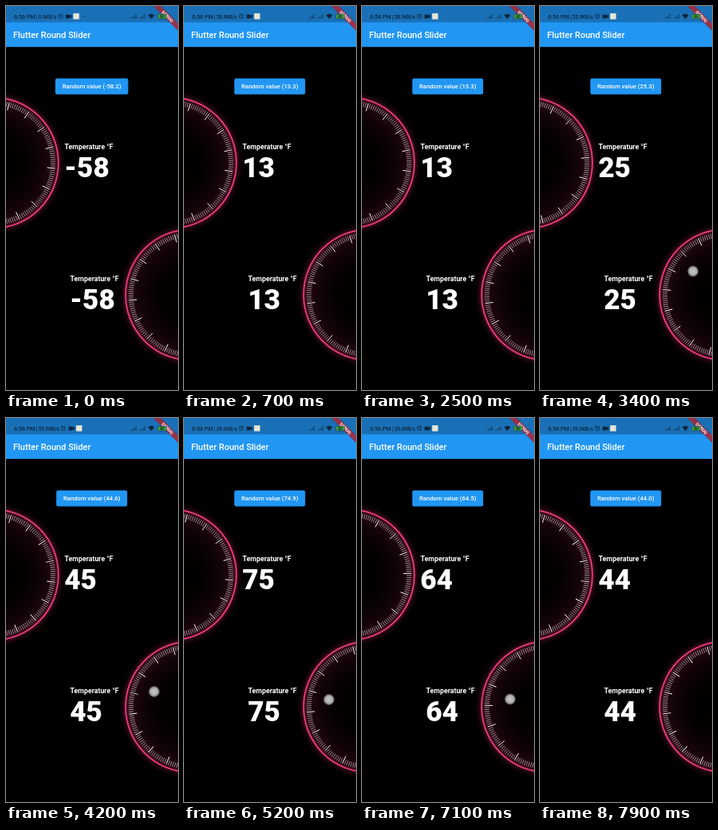
Recreate the animation shown at these times as an HTML page. Size 216 by 480 pixels, loop 8000 ms.

```html
<!DOCTYPE html>
<html lang="en">
<head>
<meta charset="utf-8">
<title>Round slider</title>
<style>
  html, body { margin: 0; width: 100%; height: 100%; overflow: hidden; background: #000; }
  svg { display: block; width: 100%; height: 100%; font-family: Roboto, sans-serif; }
  .label { font-size: 8.8px; font-weight: 700; fill: #fff; }
  .value { font-size: 35.2px; font-weight: 900; fill: #fff; }
  .status { fill: #0b2740; font-weight: 500; }
</style>
</head>
<body>
<svg viewBox="0 0 216 480">
  <defs>
    <radialGradient id="glow">
      <stop offset="0" stop-color="#000"/>
      <stop offset=".45" stop-color="#040002"/>
      <stop offset=".7" stop-color="#120309"/>
      <stop offset=".84" stop-color="#220611"/>
      <stop offset=".89" stop-color="#3c0c1f"/>
      <stop offset=".91" stop-color="#420e22"/>
      <stop offset=".95" stop-color="#19050d"/>
      <stop offset="1" stop-color="#000"/>
    </radialGradient>
    <radialGradient id="finger">
      <stop offset="0" stop-color="#c4c4c4"/>
      <stop offset=".55" stop-color="#b4b4b4"/>
      <stop offset=".75" stop-color="#959595"/>
      <stop offset="1" stop-color="#666" stop-opacity=".35"/>
    </radialGradient>
    <g id="face">
      <circle r="90" fill="url(#glow)"/>
      <circle r="81.8" fill="none" stroke="#f23e7d" stroke-width="1.7"/>
    </g>
    <g id="ticks" fill="none">
      <path id="minor" stroke="#c9c0c4" stroke-width=".65"/>
      <path id="major" stroke="#fff" stroke-width=".9"/>
    </g>
  </defs>

  <rect width="216" height="480"/>

  <g transform="translate(-16 196)"><use href="#face"/><use id="left" href="#ticks"/></g>
  <g transform="translate(232 361)"><use href="#face"/><use id="right" href="#ticks"/></g>

  <rect width="216" height="51.2" fill="#2196f3"/>
  <rect width="216" height="20.4" fill="#1a70b6"/>
  <text x="9" y="40" font-size="11" font-weight="500" fill="#fff">Flutter Round Slider</text>

  <g transform="translate(216 0) rotate(45)">
    <rect x="-24" y="14.9" width="48" height="7.4" fill="#000" opacity=".15"/>
    <rect x="-24" y="15.4" width="48" height="6.4" fill="#a92b3c" opacity=".88"/>
    <text y="20.6" font-size="5.6" font-weight="900" text-anchor="middle" fill="#f3e6ea">DEBUG</text>
  </g>

  <text class="status" x="10" y="15.6" font-size="7.1">6:56 PM</text>
  <text class="status" x="37.5" y="15.5" font-size="6.3" id="speed"></text>
  <g id="icons">
    <circle cx="68.4" cy="13" r="2.6" fill="none" stroke="#0b2740" stroke-width=".8"/>
    <path d="M68.4 11.5V13.2H69.8M65.6 10.8L66.8 9.8M71.2 10.8L70 9.8" fill="none" stroke="#0b2740" stroke-width=".6"/>
    <path d="M75 10.8h5v1.3l2.4-1.3v4.5l-2.4-1.3v1.4h-5z" fill="#0b2740"/>
    <rect x="84.5" y="9.2" width="7.4" height="7.4" fill="#e8e6d8"/>
  </g>
  <circle id="dot" cx="98" cy="13" r=".7" fill="#0b2740"/>
  <g fill="#0b2740">
    <path id="bars" d="M156.5 15.8v-1.4h1.1v1.4zM158.6 15.8v-2.6h1.1v2.6zM160.7 15.8v-4h1.1v4zM162.8 15.8v-5.6h1.1v5.6z" opacity=".65"/>
    <use href="#bars" x="11"/>
    <path d="M178.5 11.6Q182.5 8 186.5 11.6L182.5 16.2z"/>
  </g>
  <rect x="190.5" y="10.3" width="11" height="5.6" rx="1.4" fill="#43a047" stroke="#0b2740" stroke-width=".5"/>
  <text x="196" y="15" font-size="5" font-weight="700" text-anchor="middle" fill="#12351f">60</text>

  <rect id="button" y="90.5" height="19.9" rx="2.2" fill="#2196f3"/>
  <text id="caption" x="107.7" y="103.3" font-size="7.7" font-weight="500" text-anchor="middle" fill="#fff"></text>

  <text class="label" x="73.5" y="179">Temperature °F</text>
  <text class="value" x="73.2" y="213.5"></text>
  <text class="label" x="80.5" y="344">Temperature °F</text>
  <text class="value" x="80.2" y="378.5"></text>

  <circle id="touch" r="7.2" fill="url(#finger)"/>
</svg>

<script>
const LOOP = 8000, STEP = 100, TURN = 0.6;
const $ = id => document.getElementById(id);
const readings = document.querySelectorAll('.value');

// time, value
const values = [[0, -58.2], [700, -58.2], [700, 13.3], [2900, 13.3], [4200, 44.6],
  [5200, 74.9], [6300, 105.4], [7500, 44], [8000, 44]];
// time, x, y
const drag = [[2900, 196, 325], [4200, 186, 342], [5200, 182, 352], [6300, 193, 370],
  [6700, 186, 361], [7500, 186, 342]];
const speeds = [[0, '0.0'], [700, '58.9'], [3300, '55.9'], [4700, '39.0']];

function sample(table, t) {
  let i = 0;
  while (i < table.length - 2 && t >= table[i + 1][0]) i++;
  const a = table[i], b = table[i + 1];
  const k = Math.min(1, Math.max(0, (t - a[0]) / (b[0] - a[0])));
  return a.slice(1).map((v, n) => v + (b[n + 1] - v) * k);
}

function tickPath(isMajor, inner) {
  let d = '';
  for (let i = 0; i < 180; i++) {
    if ((i % 10 === 0) !== isMajor) continue;
    const a = i * Math.PI / 90, c = Math.cos(a), s = Math.sin(a);
    d += `M${(c * inner).toFixed(2)} ${(s * inner).toFixed(2)}L${(c * 78).toFixed(2)} ${(s * 78).toFixed(2)}`;
  }
  return d;
}
$('minor').setAttribute('d', tickPath(false, 72));
$('major').setAttribute('d', tickPath(true, 68));

function draw(t) {
  const [v] = sample(values, t);
  $('caption').textContent = `Random value (${v.toFixed(1)})`;
  const width = $('caption').getComputedTextLength() + 17.6;
  $('button').setAttribute('x', 107.7 - width / 2);
  $('button').setAttribute('width', width);
  readings.forEach(r => r.textContent = Math.round(v));

  $('left').setAttribute('transform', `rotate(${v * TURN})`);
  $('right').setAttribute('transform', `rotate(${-v * TURN})`);

  const speed = speeds.filter(s => s[0] <= t).pop()[1];
  const short = speed.length < 4;
  $('speed').textContent = `| ${speed}KB/s`;
  $('icons').setAttribute('transform', `translate(${short ? 0 : 3.6} 0)`);
  $('dot').setAttribute('visibility', short ? 'visible' : 'hidden');

  const [x, y] = sample(drag, t);
  const held = t >= drag[0][0] && t <= drag[drag.length - 1][0];
  $('touch').setAttribute('visibility', held ? 'visible' : 'hidden');
  $('touch').setAttribute('transform', `translate(${x} ${y})`);
}

const start = performance.now();
function tick(now) {
  const t = Math.max(0, now - start) % LOOP;
  draw(Math.floor(t / STEP) * STEP);
  requestAnimationFrame(tick);
}
draw(0);
requestAnimationFrame(tick);
</script>
</body>
</html>
```
